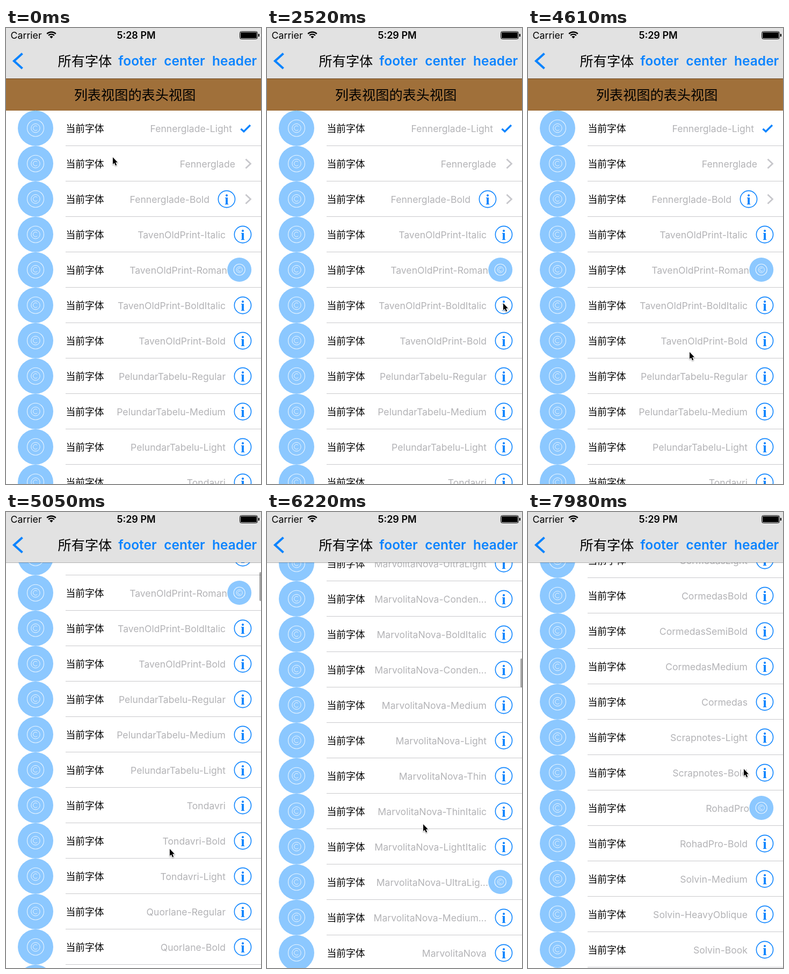
An HTML page with a canvas for the animation above (8000 ms loop, 475 px wide and 850 px high).

```html
<!DOCTYPE html>
<html lang="zh-CN">
<head>
<meta charset="utf-8">
<style>
html, body { margin: 0; width: 100%; height: 100%; overflow: hidden; background: #fff; }
canvas { display: block; width: 475px; height: 850px; }
</style>
</head>
<body>
<canvas id="stage"></canvas>
<script>
const W = 475, H = 850, LOOP = 8000;
const NAV_BOTTOM = 94, LIST_TOP = 154, ROW = 66;
const BLUE = '#0c84ff', PALE = '#8cc8ff', GRAY = '#b3b3b6', LINE = '#c9c9cc';
const LATIN = 'Inter, "Noto Sans", sans-serif';
const HAN = '"Noto Sans CJK SC", "Noto Sans CJK", sans-serif';

const canvas = document.getElementById('stage');
const ctx = canvas.getContext('2d');
const ratio = window.devicePixelRatio || 1;
canvas.width = W * ratio;
canvas.height = H * ratio;
ctx.scale(ratio, ratio);

// Each line is a family followed by its styles; "_" is the plain face.
const names = `Fennerglade Light _ Bold
TavenOldPrint Italic Roman BoldItalic Bold
PelundarTabelu Regular Medium Light
Tondavri _ Bold Light
Quorlane Regular Bold Italic
Brisselda Light Medium Bold Italic
ViltSans Italic SemiBold Light Bold SemiBoldItalic UltraBold
OvaleTDRusticNew Bold Thin Ult... Re... Light Me... Se...
CrayonBolt Thin Wide
SolvinNextCondensed ... ... ... ... ... ... ... ...
Pemberlune Regular Bold Italic Light Medium Thin
MarvolitaNova Italic Bold UltraLight Conden... BoldItalic Conden... Medium Light Thin ThinItalic LightItalic UltraLig... Medium... _ Bold Italic
Larkhovel Regular Bold Italic BoldItalic Light Medium Thin
TessoraMono Regular Bold Oblique Light Medium Black
Quildenne Regular Medium Light Bold Thin Book Italic
SorvalaTandemWR Bold _
TinKuangTR Medium Regular Light Ultralight Semibold Thin
DolavistTandemWR Bold _
CormedasLight _
CormedasBold _
CormedasSemiBold _
CormedasMedium _
Cormedas _
Scrapnotes Light Bold
RohadPro _ Bold
Solvin Medium HeavyOblique Book Light`.split('\n').flatMap(line => {
  const [family, ...styles] = line.split(' ');
  return styles.map(s => s === '_' ? family : family + '-' + s);
});

const pointerKeys = [
  [0, 199, 241], [3, 262, 350], [6, 360, 441], [8, 394, 233], [9, 404, 280],
  [10, 415, 360], [11, 414, 332], [12, 414, 332], [13, 415, 332], [14, 415, 332],
  [15, 430, 430], [16, 438, 538], [17, 440, 513], [18, 440, 513], [20, 445, 470],
  [21, 444, 438], [22, 436, 452], [24, 405, 540], [26, 372, 592], [27, 372, 592],
  [31, 301, 604], [38, 311, 659], [42, 291, 582], [47, 286, 491], [49, 283, 491],
  [51, 283, 491], [54, 402, 479]
];
const scrollKeys = [
  [31, 0], [32, 30], [33, 130], [34, 300], [35, 540], [38, 1645],
  [42, 3457], [47, 5769], [48, 6150], [49, 6367]
];

function tickAt(ms) {
  return ms < 4600 ? Math.floor((ms + 10) / 148.7) : 31 + Math.floor((ms - 4600) / 146.7);
}

function sample(keys, tick) {
  if (tick <= keys[0][0]) return keys[0].slice(1);
  const i = keys.findIndex(k => k[0] >= tick);
  if (i < 0) return keys[keys.length - 1].slice(1);
  const a = keys[i - 1], b = keys[i], u = (tick - a[0]) / (b[0] - a[0]);
  return a.slice(1).map((v, j) => Math.round(v + (b[j + 1] - v) * u));
}

function text(str, x, y, font, color, align = 'left') {
  ctx.font = font;
  ctx.fillStyle = color;
  ctx.textAlign = align;
  ctx.fillText(str, x, y);
}

function polyline(points, color, width) {
  ctx.beginPath();
  points.forEach(([x, y]) => ctx.lineTo(x, y));
  ctx.strokeStyle = color;
  ctx.lineWidth = width;
  ctx.stroke();
}

function ring(x, y, r, color, width, from = 0, to = Math.PI * 2) {
  ctx.beginPath();
  ctx.arc(x, y, r, from, to);
  ctx.strokeStyle = color;
  ctx.lineWidth = width;
  ctx.stroke();
}

function badge(x, y, r) {
  const k = r / 33, white = '#e9f5ff';
  ctx.fillStyle = PALE;
  ctx.beginPath();
  ctx.arc(x, y, r, 0, Math.PI * 2);
  ctx.fill();
  ring(x, y, 15.5 * k, white, 1.1);
  ring(x, y, 8.2 * k, white, 1);
  ring(x, y, 4.4 * k, white, 1, 0.75, Math.PI * 2 - 0.75);
}

function info(x, y) {
  ring(x, y, 15.6, BLUE, 1.6);
  text('i', x, y + 9.5, 'bold 27px "Liberation Serif", serif', BLUE, 'center');
}

function chevron(y) {
  polyline([[446.5, y - 8.5], [455.5, y], [446.5, y + 8.5]], '#c7c7cc', 2.8);
}

// Draws the accessory and returns the right edge left for the detail text.
function accessory(k, y) {
  if (k === 0) {
    polyline([[437.5, y + 1], [443, y + 6], [455, y - 6]], BLUE, 3.4);
    return 421;
  }
  if (k === 1) { chevron(y); return 427; }
  if (k === 2) { info(411, y); chevron(y); return 379; }
  if (k % 14 === 4) { badge(434.7, y - 0.5, 22.5); return 412; }
  info(441, y);
  return 409;
}

function drawList(scroll) {
  ctx.save();
  ctx.beginPath();
  ctx.rect(0, NAV_BOTTOM, W, H - NAV_BOTTOM);
  ctx.clip();
  const top = LIST_TOP - scroll;
  if (top > NAV_BOTTOM) {
    ctx.fillStyle = '#a0703a';
    ctx.fillRect(0, top - 60, W, 60);
    text('列表视图的表头视图', 240, top - 20.5, '25.2px ' + HAN, '#000', 'center');
  }
  const first = Math.max(0, Math.floor((NAV_BOTTOM - top) / ROW));
  for (let k = first; k < names.length && top + k * ROW < H; k++) {
    const y = top + k * ROW;
    badge(55, y + 32.7, 33);
    text('当前字体', 111.5, y + 40.3, '17.8px ' + HAN, '#000');
    const right = accessory(k, y + 33);
    text(names[k], right, y + 40, '17.6px ' + LATIN, GRAY, 'right');
    ctx.fillStyle = LINE;
    ctx.fillRect(111, y + 65, W - 111, 1);
  }
  ctx.restore();
}

function drawBars(clock) {
  ctx.fillStyle = '#e2e2e2';
  ctx.fillRect(0, 0, W, NAV_BOTTOM);
  ctx.fillStyle = 'rgba(0,0,0,.3)';
  ctx.fillRect(0, NAV_BOTTOM, W, 1);

  text('Carrier', 8.5, 20, '17.8px ' + LATIN, '#000');
  text(clock, 242.5, 20, '600 18px ' + LATIN, '#000', 'center');
  const up = -Math.PI / 2, spread = 0.76;
  ring(84.5, 19.5, 12, '#000', 2.4, up - spread, up + spread);
  ring(84.5, 19.5, 7.8, '#000', 2.3, up - spread, up + spread);
  ring(84.5, 19.5, 2.3, '#000', 4.6, up - spread, up + spread);

  ctx.beginPath();
  ctx.roundRect(435.5, 6.5, 33, 14, 3);
  ctx.strokeStyle = '#000';
  ctx.lineWidth = 1;
  ctx.stroke();
  ctx.fillStyle = '#000';
  ctx.fillRect(437, 8, 30, 11);
  ctx.fillRect(470, 11, 2, 5);

  polyline([[30.5, 47.5], [15, 61.5], [30.5, 75.5]], BLUE, 4.2);
  text('所有字体', 96.5, 70.8, '500 25.2px ' + HAN, '#000');
  [['footer', 245], ['center', 332.5], ['header', 425.7]].forEach(([label, x]) =>
    text(label, x, 70, '600 24.5px ' + LATIN, BLUE, 'center'));
}

function drawScrollbar(scroll) {
  ctx.fillStyle = 'rgba(0,0,0,.35)';
  ctx.beginPath();
  ctx.roundRect(472, Math.round(97 + scroll * 0.0508), 4, 54, 2);
  ctx.fill();
}

function drawPointer(x, y) {
  const arrow = new Path2D('M0 0V13L2.9 10.4 5.1 15.4 7.2 14.5 5.1 9.6H9Z');
  ctx.save();
  ctx.translate(x, y);
  ctx.lineJoin = 'round';
  ctx.strokeStyle = '#fff';
  ctx.lineWidth = 2.2;
  ctx.shadowColor = 'rgba(0,0,0,.35)';
  ctx.shadowBlur = 2;
  ctx.shadowOffsetY = 1;
  ctx.stroke(arrow);
  ctx.shadowColor = 'transparent';
  ctx.fillStyle = '#000';
  ctx.fill(arrow);
  ctx.restore();
}

function draw(ms) {
  const tick = tickAt(ms);
  const [scroll] = sample(scrollKeys, tick);
  ctx.fillStyle = '#fff';
  ctx.fillRect(0, 0, W, H);
  drawList(scroll);
  drawBars(tick < 16 ? '5:28 PM' : '5:29 PM');
  if (scroll > 0 && tick < 53) drawScrollbar(scroll);
  drawPointer(...sample(pointerKeys, tick));
}

const start = performance.now();
function frame() {
  draw((performance.now() - start) % LOOP);
  requestAnimationFrame(frame);
}
frame();
</script>
</body>
</html>
```
